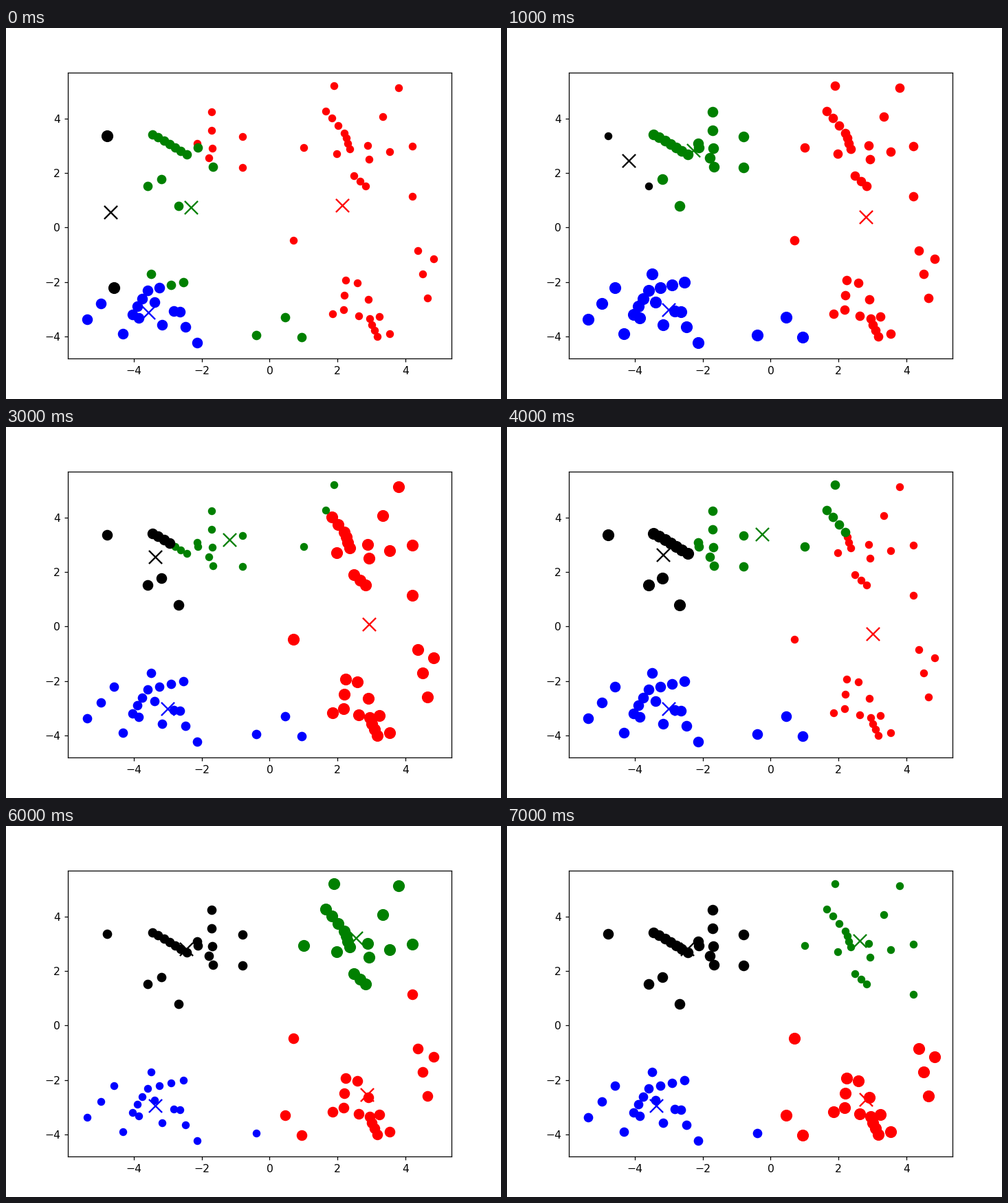
Write a matplotlib script that moves like this. It is 720 by 540 pixels and loops after 8 s.

```python
import numpy as np
import matplotlib.pyplot as plt
from matplotlib.animation import FuncAnimation

STEPS = 8
COLORS = ["red", "green", "blue", "black"]
SIZES = [40, 60, 80, 100]


def strand(n, *keys):
    """n points spread evenly along the path through the key points."""
    x, y = zip(*keys)
    at = np.linspace(0, len(keys) - 1, n)
    return np.column_stack([np.interp(at, range(len(keys)), v)
                            for v in (x, y)])


upper_right = [
    strand(7, (1.66, 4.27), (2.20, 3.47), (2.36, 2.88)),
    strand(3, (1.01, 2.93), (2.93, 2.50)),
    strand(3, (2.49, 1.90), (2.83, 1.51)),
    strand(3, (3.79, 5.12), (2.88, 3.00)),
    [(1.89, 5.19), (4.21, 2.98), (3.54, 2.78), (4.20, 1.13)],
]
upper_left = [
    strand(7, (-3.45, 3.42), (-2.45, 2.68)),
    strand(4, (-1.72, 4.24), (-1.68, 2.23)),
    [(-2.13, 3.09), (-2.12, 2.94), (-1.79, 2.55), (-4.79, 3.36),
     (-0.79, 3.34), (-0.80, 2.19), (-3.59, 1.53), (-3.19, 1.78),
     (-2.68, 0.78)],
]
lower_right = [
    strand(4, (2.94, -3.36), (3.17, -4.00)),
    strand(4, (2.59, -2.03), (3.54, -3.90)),
    strand(3, (2.23, -1.93), (2.17, -3.03)),
    strand(3, (4.36, -0.84), (4.66, -2.58)),
    [(4.84, -1.15), (0.70, -0.48), (0.45, -3.30), (0.94, -4.02),
     (1.86, -3.18), (2.62, -3.26)],
]
lower_left = [
    strand(7, (-2.55, -2.02), (-3.60, -2.32), (-4.05, -3.20)),
    strand(3, (-5.37, -3.38), (-4.58, -2.22)),
    strand(3, (-4.32, -3.90), (-3.40, -2.74)),
    strand(3, (-2.82, -3.06), (-2.13, -4.22)),
    [(-2.65, -3.10), (-3.49, -1.72), (-3.17, -3.57), (-0.39, -3.96)],
]
points = np.vstack(upper_right + upper_left + lower_right + lower_left)
seeds = np.array([(1.24, 1.19), (-1.96, -0.81),
                  (-4.09, -3.86), (-5.46, -1.12)])


def kmeans(centers, steps):
    """Return (labels, centers) after each k-means step."""
    history = []
    for _ in range(steps):
        dist = np.linalg.norm(points[:, None] - centers[None], axis=2)
        labels = dist.argmin(axis=1)
        centers = np.array([points[labels == k].mean(axis=0)
                            for k in range(len(centers))])
        history.append((labels, centers))
    return history


history = kmeans(seeds, STEPS)

fig, ax = plt.subplots(figsize=(6.4, 4.8), dpi=112.5)
dots = [ax.scatter([], [], c=c, zorder=2 + k / 10)
        for k, c in enumerate(COLORS)]
crosses = [ax.scatter([], [], s=150, c=c, marker="x", zorder=2.05 + k / 10)
           for k, c in enumerate(COLORS)]
ax.set_xlim(-5.947, 5.360)
ax.set_ylim(-4.801, 5.683)
ax.set_xticks(range(-4, 5, 2))
ax.set_yticks(range(-4, 5, 2))


def update(step):
    labels, centers = history[step]
    for k in range(len(COLORS)):
        dots[k].set_offsets(points[labels == k])
        dots[k].set_sizes([SIZES[(k + step) % len(SIZES)]])
        crosses[k].set_offsets(centers[k:k + 1])
    return dots + crosses


anim = FuncAnimation(fig, update, frames=STEPS, interval=1000,
                     repeat=True, repeat_delay=0)
plt.show()
```
